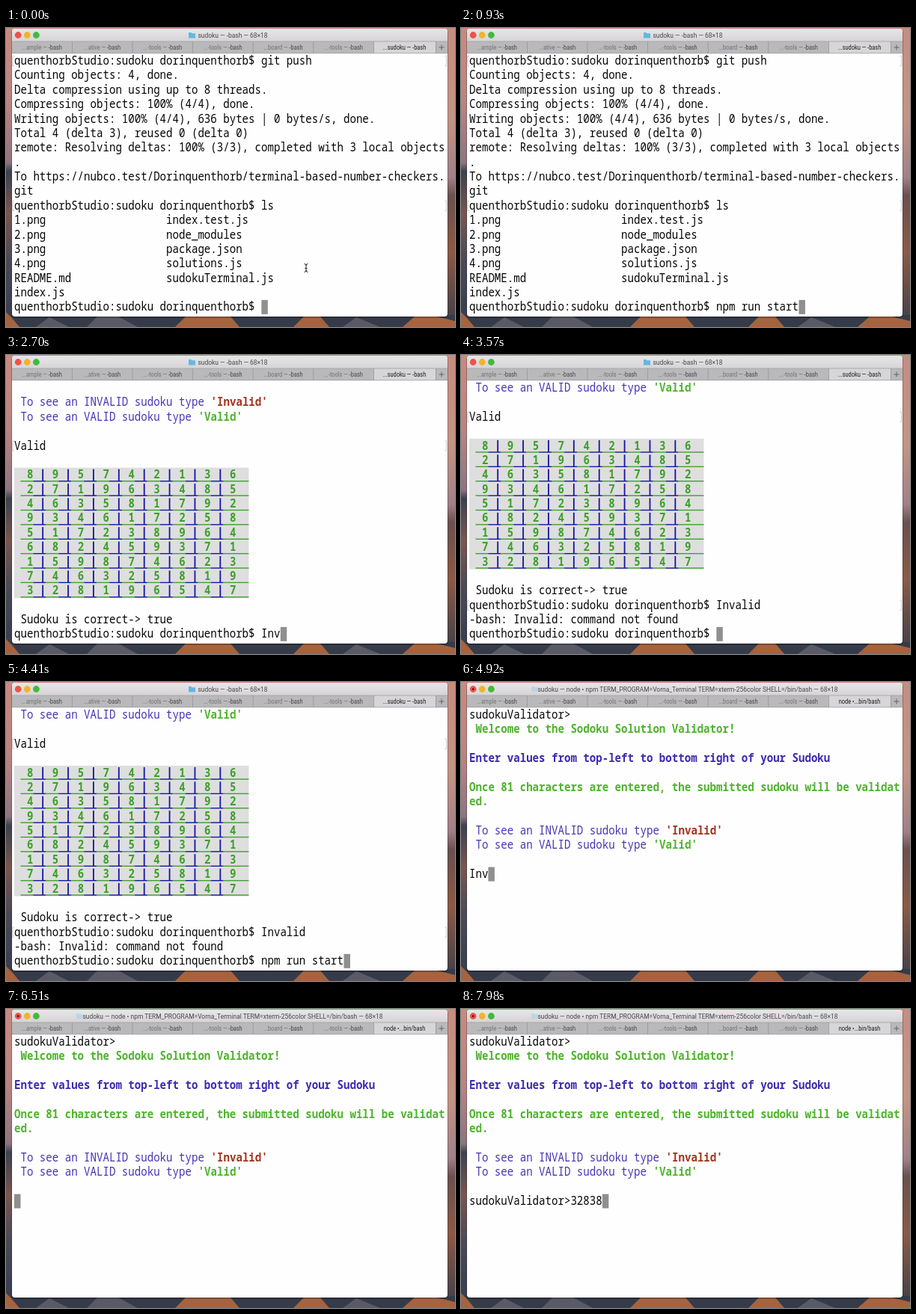
Write an HTML page that moves like this. It is 600 by 400 pixels and loops after 8 s.

```html
<!DOCTYPE html>
<html lang="en">
<head>
<meta charset="utf-8">
<title>Sudoku validator in a terminal</title>
<style>
html, body { margin: 0; width: 100%; height: 100%; overflow: hidden; background: #3a3f4c; }
svg { display: block; width: 600px; height: 400px; }
text { white-space: pre; }
.mono { font: 500 14.117px "Noto Sans Mono", "DejaVu Sans Mono", monospace; fill: #060606; }
.ui { font-family: Roboto, "Liberation Sans", sans-serif; text-anchor: middle; fill: #484848; }
.bold { font-weight: 700; }
.green { fill: #4fb32e; }
.leaf { fill: #3fa02c; }
.indigo { fill: #3d2bb0; }
.violet { fill: #4a35b6; }
.rust { fill: #a23420; }
.maroon { fill: #8e1414; }
.navy { fill: #1414a0; }
</style>
</head>
<body>
<svg viewBox="0 0 600 400" xmlns="http://www.w3.org/2000/svg">
  <defs>
    <linearGradient id="left" x2="0" y2="1">
      <stop offset="0" stop-color="#c98a80"/><stop offset=".25" stop-color="#b98482"/>
      <stop offset=".45" stop-color="#8f7480"/><stop offset=".48" stop-color="#3c4252"/>
      <stop offset=".62" stop-color="#7a5650"/><stop offset=".78" stop-color="#4a4a58"/>
      <stop offset="1" stop-color="#343d4e"/>
    </linearGradient>
    <linearGradient id="right" x2="0" y2="1">
      <stop offset="0" stop-color="#c68c80"/><stop offset=".3" stop-color="#c49484"/>
      <stop offset=".5" stop-color="#a08088"/><stop offset=".56" stop-color="#6a5050"/>
      <stop offset=".75" stop-color="#8c5a44"/><stop offset="1" stop-color="#3c3e4a"/>
    </linearGradient>
    <linearGradient id="bar" x2="0" y2="1">
      <stop offset="0" stop-color="#e9e6e8"/><stop offset="1" stop-color="#d5d3d5"/>
    </linearGradient>
  </defs>
  <rect width="300" height="400" fill="url(#left)"/>
  <rect x="300" width="300" height="400" fill="url(#right)"/>
  <rect y="384" width="600" height="16" fill="#363b49"/>
  <path d="M0 400V380L8 388 18 400ZM226 400 240 386H300L312 400ZM384 400 398 386H420L432 400ZM530 400 546 386H576L600 392V400Z" fill="#a5633f"/>
  <path d="M40 400 58 387 84 400ZM108 400 122 386H150L176 400ZM450 400 468 387 500 400Z" fill="#595a66"/>
  <rect x="7" y="1" width="584" height="387" rx="5" fill="#000" opacity=".25"/>
  <rect x="8" y="1" width="582" height="385" rx="4" fill="#fefefe"/>
  <path d="M8 18V5a4 4 0 0 1 4-4H586a4 4 0 0 1 4 4V18Z" fill="url(#bar)"/>
  <rect x="8" y="18" width="582" height="16" fill="#b9b8ba"/>
  <rect x="491" y="18" width="83" height="16" fill="#d6d5d7"/>
  <g id="chrome"></g>
  <g id="screen"></g>
</svg>
<script>
const LOOP = 8000, ROWS = 18, COL = 576 / 68, ROW = 19.38;
const LEFT = 11, TOP = 34.4, BASE = 14.6, TALL = 1.13;
const HOST = "quenthorbStudio", USER = "dorinquenthorb";
const START = "npm run start";

const rect = (x, y, w, h, fill, cls = "") =>
  `<rect x="${x}" y="${y}" width="${w}" height="${h}" fill="${fill}" class="${cls}"/>`;
const text = (x, y, str, cls, extra = "") =>
  `<text transform="matrix(1 0 0 ${TALL} ${x} ${y})" class="${cls}" ${extra}>${str}</text>`;
const colX = c => LEFT + c * COL;

// A line holds coloured spans, or the cells of a sudoku row.
const line = (str = "", cls = "", mark = false) => ({ spans: [[str, cls]], mark });
const prompt = (cmd = "", mark = false) => line(`${HOST}:sudoku ${USER}$ ${cmd}`, "", mark);
const pair = (a, b) => line(a.padEnd(24) + b);
const hint = (kind, word, cls) => ({
  spans: [[` To see an ${kind} sudoku type `, "violet"], [`'${word}'`, "bold " + cls]]
});

const pushed = [
  prompt("git push", true),
  ...["Counting objects: 4, done.",
    "Delta compression using up to 8 threads.",
    "Compressing objects: 100% (4/4), done.",
    "Writing objects: 100% (4/4), 636 bytes | 0 bytes/s, done.",
    "Total 4 (delta 3), reused 0 (delta 0)",
    "remote: Resolving deltas: 100% (3/3), completed with 3 local objects",
    ".",
    "To https://nubco.test/Dorinquenthorb/terminal-based-number-checkers.",
    "git"].map(s => line(s)),
  prompt("ls", true),
  pair("1.png", "index.test.js"),
  pair("2.png", "node_modules"),
  pair("3.png", "package.json"),
  pair("4.png", "solutions.js"),
  pair("README.md", "sudokuTerminal.js"),
  line("index.js")
];

const welcome = [
  line("sudokuValidator>"),
  line(" Welcome to the Sodoku Solution Validator!", "bold green"),
  line(),
  line("Enter values from top-left to bottom right of your Sudoku", "bold indigo"),
  line(),
  line("Once 81 characters are entered, the submitted sudoku will be validat", "bold green"),
  line("ed.", "bold green"),
  line(),
  hint("INVALID", "Invalid", "rust"),
  hint("VALID", "Valid", "green"),
  line()
];

// "!" after a digit marks a wrong one.
const VALID = "895742136 271963485 463581792 934617258 517238964 682459371 159874623 746325819 328196547";
const INVALID = "48!396!72!51 9!21345876! 6!578!2!14!9!3 5!487!2!9!136! 132!56!4!79!8 " +
  "9!7!6138245! 37!2!814!69!5! 6!8!92534!17 5!147!6!9!382";

const result = (word, grid, green, ok) => [
  ...welcome, line(word, "", true), line(),
  ...grid.split(" ").map(row => ({ cells: row.match(/\d!?/g), green })),
  line(), line(` Sudoku is correct-> ${ok}`)
];
const solved = result("Valid", VALID, "leaf", true);
const failed = result("Invalid", INVALID, "green", false);
const rejected = [...solved, prompt("Invalid", true), line("-bash: Invalid: command not found")];

const typed = (t, from, step, str) =>
  str.slice(0, Math.max(0, Math.floor((t - from) / step) + 1));

// Each scene: end time, lines, whether node is running.
const scenes = [
  [960, t => [...pushed, prompt(typed(t, 240, 50, START))], () => false],
  [1230, () => [...pushed, prompt(START, true), line()], () => true],
  [2250, t => [...welcome, line(typed(t, 1680, 110, "Valid"))], () => true],
  [3240, t => [...solved, prompt(typed(t, 2500, 90, "Invalid"))], t => t < 2430],
  [4500, t => [...rejected, prompt(typed(t, 3700, 55, START))], () => false],
  [4680, () => [...rejected, prompt(START, true), line()], () => true],
  [5340, t => [...welcome, line(typed(t, 4780, 70, "Invalid"))], () => true],
  [6330, t => [...failed, prompt(typed(t, 5700, 45, START))], t => t < 5600],
  [6480, () => [...failed, prompt(START, true), line()], () => true],
  [LOOP, t => {
    const keys = typed(t, 7150, 170, "32838");
    return [...welcome, line(keys && "sudokuValidator>" + keys)];
  }, () => true]
];

function drawCells({ cells, green }, y) {
  let out = rect(LEFT, y, 37 * COL, ROW + .2, "#dededf");
  cells.forEach((cell, i) => {
    const c = 1 + i * 4, last = i === 8;
    const cls = cell[1] ? "maroon" : green;
    out += rect(colX(c), y + 17.4, COL * (last ? 4 : 2), 1.4, "", cls);
    out += text(colX(c + 1), y + BASE, cell[0], "mono bold " + cls);
    if (!last) {
      out += rect(colX(c + 2), y + 17.4, COL * 2, 1.4, "", "navy");
      out += rect(colX(c + 3.4), y + 2, 1.8, 16, "", "navy");
    }
  });
  return out;
}

function drawLine(l, row) {
  const y = TOP + row * ROW;
  if (l.cells) return drawCells(l, y);
  let c = 0, out = "";
  for (const [str, cls] of l.spans) {
    if (str) out += text(colX(c), y + BASE, str, "mono " + cls);
    c += str.length;
  }
  if (l.mark) {
    const h = ROW - 6;
    out += `<path d="M11 ${y + 3}h-2v${h}h2M586.5 ${y + 3}h2v${h}h-2" fill="none" stroke="#c9c9c9"/>`;
  }
  return out;
}

function drawScreen(lines, pointer) {
  const view = lines.slice(-ROWS), end = view.length - 1;
  const chars = view[end].spans[0][0].length;
  let out = view.map(drawLine).join("");
  out += rect(colX(chars), TOP + end * ROW, COL, ROW - .4, "#8f8f90");
  if (pointer)
    out += `<path d="M398.5 315.5q2.5 0 2.5 2q0-2 2.5-2M401 317V325M398.5 326.5q2.5 0 2.5-2q0 2 2.5 2M399.5 321.5h3" fill="none" stroke="#222"/>`;
  return out;
}

function drawChrome(busy) {
  let out = ["#f0524a", "#f0b429", "#3fbb3c"].map((fill, i) =>
    `<circle cx="${16.2 + i * 12.1}" cy="9.5" r="4.4" fill="${fill}"/>`).join("");
  if (busy) out += `<circle cx="16.2" cy="9.5" r="1.5" fill="#6e1410"/>`;
  const x = busy ? 94 : 244;
  out += `<path d="M${x} 6h3.5l1 1.2h4.5v6.3h-9z" fill="${busy ? "#bcd6e2" : "#62b8e0"}"/>`;
  const title = busy
    ? "sudoku — node • npm TERM_PROGRAM=Vorna_Terminal TERM=xterm-256color SHELL=/bin/bash — 68×18"
    : "sudoku — -bash — 68×18";
  out += text(303, 13, title, "ui", 'font-size="8.45"');
  out += rect(8, 17.6, 582, .8, "#a2a1a3") + rect(8, 33.4, 582, .8, "#a2a1a3");
  ["ample", "ative", "-tools", "-tools", "board", "-tools"].forEach((name, i) => {
    out += text(48 + i * 80.6, 29, `<tspan fill="#727174">...${name} — </tspan>-bash`, "ui", 'font-size="7.4"');
    out += rect(88 + i * 80.6, 18, .8, 16, "#979698");
  });
  out += text(532.5, 29, busy ? "node •...bin/bash" : "...sudoku — -bash", "ui",
    'font-size="7.4" style="fill:#1b1b1b"');
  out += rect(574, 18, .8, 16, "#979698");
  return out + `<path d="M578.5 26h7M582 22.5v7" stroke="#646464"/>`;
}

const parts = {};
function show(id, html) {
  if (parts[id] === html) return;
  document.getElementById(id).innerHTML = parts[id] = html;
}

function render(t) {
  const [, lines, busy] = scenes.find(s => t < s[0]);
  show("chrome", drawChrome(busy(t)));
  show("screen", drawScreen(lines(t), t < 240));
}

const began = performance.now();
function tick() {
  render((performance.now() - began) % LOOP);
  requestAnimationFrame(tick);
}
tick();
</script>
</body>
</html>
```
